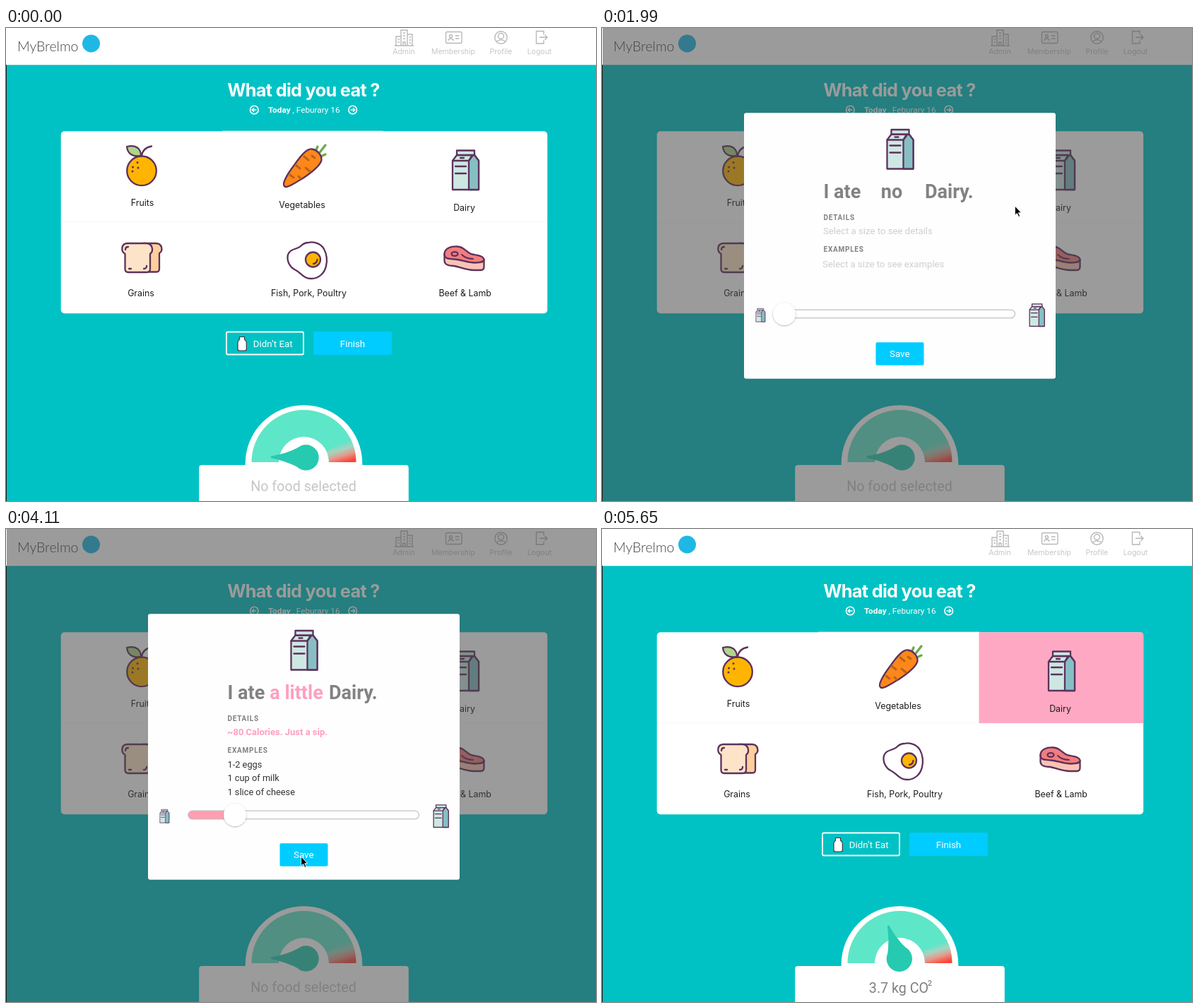
An HTML page that plays this animation: 835 px wide and 670 px high, repeating every 5.75 s.

```html
<!DOCTYPE html>
<html lang="en">
<head>
<meta charset="utf-8">
<title>What did you eat ?</title>
<style>
  html, body { margin: 0; width: 100%; height: 100%; overflow: hidden; background: #00c2c4; }
  svg.stage { display: block; width: 100vw; height: 100vh; }
  text { font-family: Roboto, sans-serif; white-space: pre; }
  .mid { text-anchor: middle; }
  .title { font: 700 25.3px Inter, sans-serif; letter-spacing: -.7px; fill: #fff; }
  .label { font: 400 12.4px Inter, sans-serif; fill: #1c1c1c; text-anchor: middle; }
  .nav text { font: 400 10.5px Inter, sans-serif; fill: #c6c6c6; text-anchor: middle; }
  .nav g { fill: none; stroke: #b8b8b8; stroke-width: 1.4; }
  .brand { font: 300 19.5px Lato, sans-serif; fill: #444; }
  .date { font-size: 11.8px; fill: #fff; }
  .btn { font-size: 13.3px; fill: #fff; text-anchor: middle; }
  .total { font-size: 19.7px; text-anchor: middle; }
  .big { font-size: 27px; font-weight: 700; fill: #828282; }
  .cap { font-size: 10px; font-weight: 700; letter-spacing: .75px; fill: #808080; }
  .hint { font-size: 13.2px; fill: #cfcfcf; }
  .item { font-size: 12.8px; fill: #333; }
  .pink { fill: #ff9fc0; }
  .fact { font-size: 13px; font-weight: 700; }
  .icon { stroke: #5d315c; stroke-width: 2.3; stroke-linejoin: round; stroke-linecap: round; fill: none; }
  /* every part of the dialog fades by itself */
  #dialog > * { opacity: var(--fade, 0); }
</style>
</head>
<body>
<svg class="stage" viewBox="0 0 835 670" preserveAspectRatio="none">
  <defs>
    <g id="carton" class="icon">
      <path d="M2 16 8 8H33L39 16V57H2Z" fill="#cde8e3"/>
      <path d="M25 16 31 8H33L39 16V57H25Z" fill="#86bfc3"/>
      <path d="M8 1.500H33V8H8Z" fill="#cde8e3"/>
      <path d="M2 16H25L29 9M13 12H18M6 24H21M6 34H21"/>
    </g>
    <linearGradient id="hot" gradientUnits="userSpaceOnUse" x1="472" y1="588" x2="480" y2="615">
      <stop offset="0" stop-color="#5ee6c8"/>
      <stop offset=".35" stop-color="#a8d3bf"/>
      <stop offset=".65" stop-color="#e59a8c"/>
      <stop offset="1" stop-color="#ff4438"/>
    </linearGradient>
    <filter id="soft" x="-30%" y="-30%" width="160%" height="160%">
      <feDropShadow dx="0" dy=".8" stdDeviation=".8" flood-opacity=".35"/>
    </filter>
  </defs>

  <rect width="835" height="670" fill="#00c2c4"/>
  <rect width="835" height="52.300" fill="#fff"/>

  <text class="brand" x="16" y="33">MyBrelmo</text>
  <circle cx="120.500" cy="22" r="12.500" fill="#1fb8e4"/>

  <g class="nav">
    <g>
      <path d="M550 25H577M552 25V12H559M559 25V3H568V25M568 9H575V25M562 25V20H565V25"/>
      <path d="M562 7H565M562 11H565M562 15H565M554.500 16H557M554.500 20H557M570.500 13H573M570.500 17H573M570.500 21H573"/>
    </g>
    <g>
      <rect x="622.500" y="5.500" width="22.500" height="16" rx="2"/>
      <circle cx="629.500" cy="11.500" r="2"/>
      <path d="M626 18C626 14 633 14 633 18M636 11H641.500M636 15H641.500"/>
    </g>
    <g>
      <circle cx="700.500" cy="13.500" r="8.700"/>
      <circle cx="700.500" cy="11.500" r="4"/>
      <path d="M694.500 19.500C696 16 705 16 706.500 19.500"/>
    </g>
    <g>
      <path d="M761 9V4.500H750.500V22H761V17.500M755 13.300H766M762.500 9.800 766 13.300 762.500 16.800"/>
    </g>
    <text x="563" y="37" font-weight="500">Admin</text>
    <text x="633" y="37">Membership</text>
    <text x="700.500" y="37">Profile</text>
    <text x="755" y="37">Logout</text>
  </g>

  <text class="title mid" x="421" y="97">What did you eat ?</text>
  <text class="date" x="371" y="119.500" font-weight="700">Today</text>
  <text class="date" x="405.500" y="119.500">, Feburary 16</text>
  <g fill="none" stroke="#fff" stroke-width="1.600">
    <circle cx="351.300" cy="116" r="5.800"/>
    <path d="M354.500 116H348.500M351 113.300 348.300 116 351 118.700"/>
    <circle cx="490.700" cy="116" r="5.800"/>
    <path d="M487.500 116H493.500M491 113.300 493.700 116 491 118.700"/>
  </g>

  <!-- food panel -->
  <rect x="77.700" y="146.200" width="688.500" height="258" rx="5" fill="#fff"/>
  <rect x="306" y="145.700" width="228" height="4" fill="#fff"/>
  <path d="M78 275H766" stroke="#f8f8f8"/>
  <path id="tile" d="M533.500 146.200H762Q766.200 146.200 766.200 150.500V275H533.500Z" fill="#ffa8c4"/>

  <g class="icon">
    <circle cx="192" cy="202.300" r="20.800" fill="#ffb400"/>
    <path d="M192 181C193 174 198 169 206 167.500"/>
    <path d="M171 168C183 165 191 170 191 181 179 183 172 178 171 168Z" fill="#b0d48b"/>
    <path d="M179.500 197V197M186 190.500V190.500M187 198V198M179 203V203" stroke-width="3"/>
  </g>
  <g class="icon">
    <path d="M437 177 441 168M441 180 452 166M443 183 452 179" stroke="#6fa84c" stroke-width="3.400"/>
    <path d="M394 224C390 221 398 207 408 194 417 181 426 170 433 171.500 441 173 447 180 446.500 187 445 195 432 205 420 213 408 220 397 228 394 224Z" fill="#ff8719"/>
    <path d="M422 182 428 187M433 181 437 184M410 194 416 199M424 198 430 203M402 208 407 212M414 210 417 213" stroke="#b5651d" stroke-width="3"/>
  </g>
  <use href="#carton" x="630" y="172"/>
  <g class="icon">
    <path d="M194 305H212C221.500 305 222.500 316 217 319V341Q217 345.500 213 345.500H194Z" fill="#fccf9b"/>
    <path d="M172 305H198C208 305 209 316 204 320V341Q204 346 199 346H173Q168.500 346 168.500 341V320C162 316 163 305 172 305Z" fill="#fde3c8"/>
    <path d="M169 314C169 311 171 310 173 310M174 341H177M195 341C198 341 199 340 199 337"/>
  </g>
  <g class="icon">
    <path d="M428 304C437 302 446 306 450 313 454 320 455 330 453 337 451 347 443 355 432 355 421 355 418 347 410 343 401 339 397 329 399 321 402 312 412 314 417 309 420 306 424 304 428 304Z" fill="#fff"/>
    <circle cx="434.500" cy="328" r="10.500" fill="#ffb400"/>
    <path d="M435 334C438 334 440.500 331 440.500 328"/>
  </g>
  <g class="icon">
    <path d="M620.500 320V330C621 336 627 337 634 337 644 339 652 343 662 343H672Q676.500 343 676.500 338V328Z" fill="#f9c3b4"/>
    <path d="M620.500 321C620 312 629 309 639 309.500 649 310 651 318 660 320.500 668 322 676 323 676.500 328 676 332 671 332.500 664 332.500 652 332.500 645 328 634 327.500 627 327 621 327 620.500 321Z" fill="#f27d7d"/>
    <ellipse cx="635" cy="320" rx="4.500" ry="2.800"/>
    <path d="M645 321C649 325 655 327 661 327" stroke-width="2"/>
  </g>

  <text class="label" x="193" y="252">Fruits</text>
  <text class="label" x="419" y="254.500">Vegetables</text>
  <text class="label" x="648.500" y="258.500">Dairy</text>
  <text class="label" x="191" y="380">Grains</text>
  <text class="label" x="428.500" y="379.500">Fish, Pork, Poultry</text>
  <text class="label" x="649.700" y="379.500">Beef &amp; Lamb</text>

  <!-- buttons -->
  <rect x="312" y="430.500" width="109" height="32" rx="2" fill="none" stroke="#fff" stroke-width="1.800"/>
  <path d="M330.500 437.500H337.500V441Q340.300 443 340.300 446V455Q340.300 457 338 457H330.500Q328 457 328 455V446Q328 443 330.500 441Z" fill="#fff" stroke="#4a3342" stroke-width="1.200"/>
  <text class="btn" x="377.700" y="452.300">Didn’t Eat</text>
  <rect x="435" y="430" width="111" height="33" rx="2" fill="#00ccff"/>
  <text class="btn" x="490.500" y="452">Finish</text>

  <!-- gauge -->
  <path d="M338.700 620V617A82.800 82.800 0 0 1 504.300 617V620Z" fill="#fff"/>
  <path d="M347.500 615A74 74 0 0 1 495.500 615H457A35.500 36 0 0 0 386 615Z" fill="#5ee6c8"/>
  <path d="M487.400 581.400A74 74 0 0 1 495.500 615H457A36 36 0 0 0 453.600 598.700Z" fill="url(#hot)"/>
  <path d="M273.200 670V623Q273.200 619 277.500 619H565.500Q569.800 619 569.800 623V670Z" fill="#fff"/>
  <g id="needle" fill="#26cab0">
    <circle cx="424.500" cy="608.500" r="18.200"/>
    <path d="M375 606.500Q397 603 414 594V622.500Q395 613 375 609Z"/>
  </g>
  <text id="none" class="total" x="421" y="656" fill="#c6c6c6">No food selected</text>
  <g id="sum" fill="#808080">
    <text class="total" x="420" y="657">3.7 kg CO</text>
    <text x="461" y="646.500" font-size="10.500" font-weight="500">2</text>
  </g>

  <rect y="52" width="1" height="618" fill="#1c1c1c"/>
  <rect id="shade" x="1" width="834" height="670" fill="#454545"/>

  <!-- dialog -->
  <g id="dialog">
    <rect x="201" y="120.300" width="441" height="376.500" rx="3" fill="#fefefe"/>
    <use href="#carton" x="401.500" y="142.500"/>
    <text class="big" x="313.500" y="240.500">I ate</text>
    <text class="big" x="457" y="240.500">Dairy.</text>
    <text class="cap" x="313.500" y="272">DETAILS</text>
    <text class="cap" x="313.500" y="316.500">EXAMPLES</text>
    <g id="empty">
      <text class="big mid" x="410" y="240.500">no</text>
      <text class="hint" x="313" y="291.500">Select a size to see details</text>
      <text class="hint" x="312" y="339.300">Select a size to see examples</text>
    </g>
    <g id="filled">
      <text class="big pink mid" x="411" y="240.500">a little</text>
      <text class="fact pink" x="313" y="291.500">~80 Calories. Just a sip.</text>
      <text class="item" x="313.500" y="337.500">1-2 eggs</text>
      <text class="item" x="313.500" y="357">1 cup of milk</text>
      <text class="item" x="313.500" y="376.700">1 slice of cheese</text>
    </g>
    <rect x="258" y="399.300" width="326.500" height="11.500" rx="5.700" fill="#fff" stroke="#cbcbcb" stroke-width="1.500"/>
    <rect id="fill" x="258" y="399.300" height="11.500" rx="5.700" fill="#ff9fb0" stroke="#d8b4bb"/>
    <circle id="knob" cy="405" r="16" fill="#fff" filter="url(#soft)"/>
    <use href="#carton" transform="translate(217.500 396.800) scale(.34)"/>
    <use href="#carton" transform="translate(604 390) scale(.57)"/>
    <rect x="387.500" y="445.300" width="68" height="32.500" rx="2" fill="#00ccff"/>
    <text class="btn" x="421.300" y="466.300">Save</text>
  </g>

  <path id="cursor" d="M.7 1V14.200L3.700 11.500 6 16.500 8 15.600 5.800 10.700H9.700Z" fill="#000" stroke="#fff" stroke-width=".9"/>
</svg>
<script>
const LOOP = 5750;
const el = id => document.getElementById(id);
const set = (id, attrs) => { for (const k in attrs) el(id).setAttribute(k, attrs[k]); };
const show = (id, on) => { el(id).style.display = on ? '' : 'none'; };

// progress 0..1 in n jumps, the first at time a and the last at time b
function steps(t, a, b, n) {
  if (t < a) return 0;
  if (t >= b) return 1;
  return (Math.floor((t - a) / (b - a) * (n - 1) + .35) + 1) / n;
}
const easeOut = (p, power) => 1 - (1 - p) ** power;
const bezier = (p, a, b, c, d) => {
  const q = 1 - p;
  return q * q * q * a + 3 * q * q * p * b + 3 * q * p * p * c + p * p * p * d;
};

// pointer moves; without bends a move is straight and eased at both ends
const home = [828, 334];
const moves = [
  { span: [230, 320, 2], to: [746, 409] },
  { span: [590, 1110, 7], to: [593, 253], bends: [[690, 575], [510, 284]] },
  { span: [1200, 1550, 5], to: [603, 239] },
  { span: [1990, 2650, 6], to: [342, 401] },
  { span: [3500, 4020, 7], to: [417, 463] },
  { span: [4750, 4750, 1], to: [564, 642] }
];

function pointer(t) {
  let at = home;
  for (const { span, to, bends } of moves) {
    const p = steps(t, ...span), from = at;
    if (!p) break;
    const [b, c] = bends || [from, to];
    at = from.map((v, i) => bezier(p, v, b[i], c[i], to[i]));
  }
  return at;
}

function draw(t) {
  const open = easeOut(steps(t, 1700, 1990, 3), 3);
  const closing = steps(t, 4380, 4610, 3);
  const shut = closing ** 1.25;
  const fade = open * (1 - shut);
  const zoom = .25 + .75 * open - .53 * shut;
  const knob = 258 + 66 * easeOut(steps(t, 2980, 3330, 5), 2);
  const turn = 70.5 * easeOut(steps(t, 4380, 5320, 9), 1.4);
  const chosen = t >= 2980;

  show('cursor', t >= 90 && t < 4900);
  set('cursor', { transform: `translate(${pointer(t)})` });
  set('shade', { opacity: .537 * fade });
  el('dialog').style.setProperty('--fade', fade);
  set('dialog', { transform: `translate(421.5 308.5) scale(${zoom}) translate(-421.5 -308.5)` });
  show('empty', !chosen);
  show('filled', chosen);
  show('fill', chosen);
  set('fill', { width: knob - 258 });
  set('knob', { cx: knob });
  set('tile', { opacity: closing });
  set('needle', { transform: `rotate(${turn} 422.5 606)` });
  set('none', { opacity: 1 - closing });
  set('sum', { opacity: closing, transform: `translate(0 ${21 * (1 - closing)})` });
}

let start = null;
function frame(now) {
  if (start === null) start = now;
  draw((now - start) % LOOP);
  requestAnimationFrame(frame);
}
draw(0);
requestAnimationFrame(frame);
</script>
</body>
</html>
```
